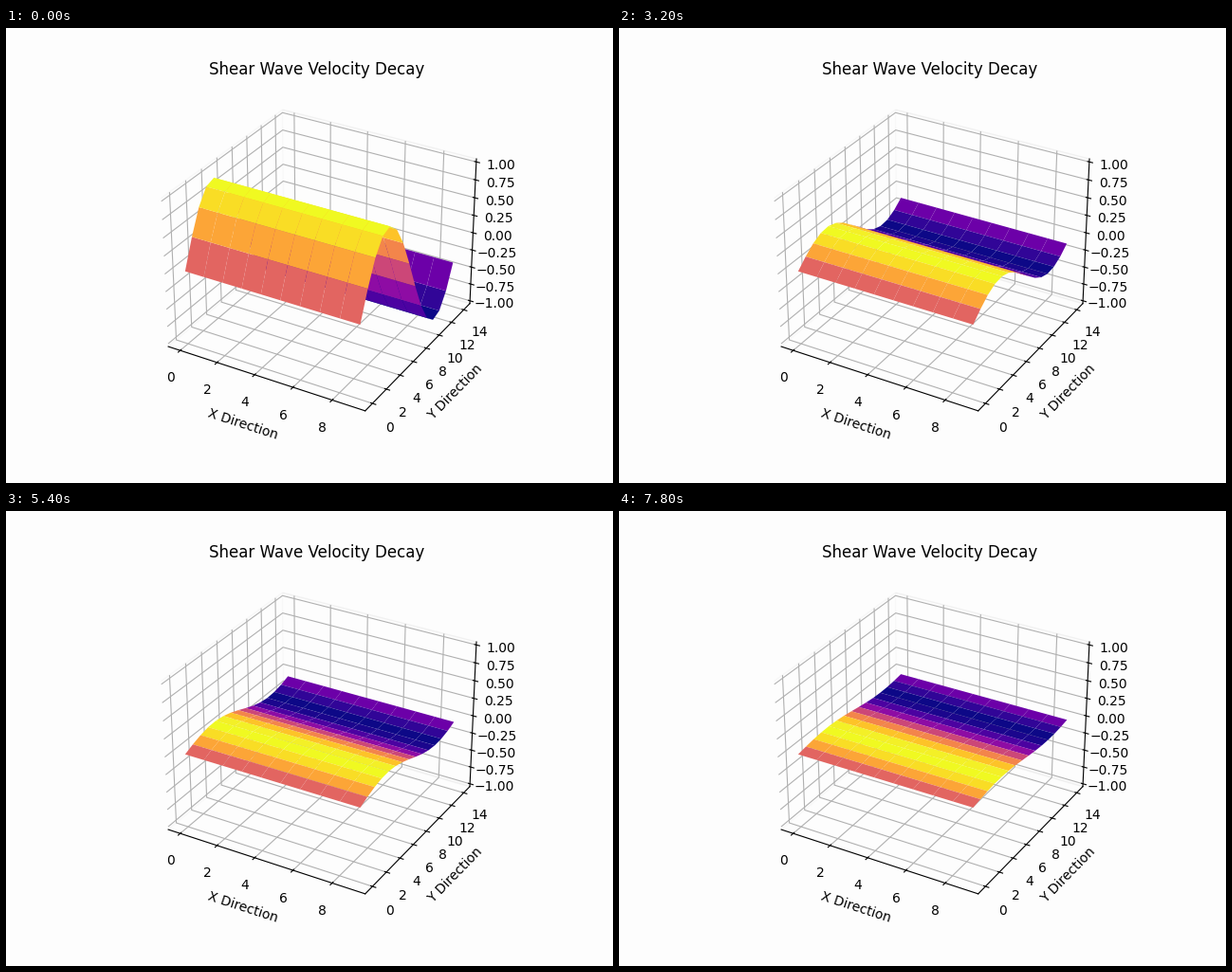
Animation of 640x480 px, one loop 8000 ms. Source, as a matplotlib script:

```python
import numpy as np
import matplotlib.pyplot as plt
from matplotlib.animation import FuncAnimation

NX, NY = 10, 15
FRAMES, INTERVAL = 40, 200
OMEGA = 0.5
PAPER = "#fdfdfd"

X, Y = np.meshgrid(np.arange(NX), np.arange(NY))


def shear_decay(steps):
    """Velocity profiles of a sine shear wave relaxed on a periodic lattice."""
    weights = np.array([1 / 6, 2 / 3, 1 / 6])[:, None]
    u = np.sin(2 * np.pi * np.arange(NY) / NY)
    g = weights * u
    profiles = []
    for _ in range(steps):
        g = g + OMEGA * (weights * u - g)
        g = np.array([np.roll(row, c) for row, c in zip(g, (-1, 0, 1))])
        u = g.sum(axis=0)
        profiles.append(u)
    return profiles


def padded(low, high, margin):
    """Widen a range by its margin, then by 1/48 on each side."""
    pad = (high - low) * margin
    low, high = low - pad, high + pad
    edge = (high - low) / 48
    return low - edge, high + edge


profiles = shear_decay(FRAMES)

fig = plt.figure(figsize=(6.4, 4.8), dpi=100, facecolor=PAPER)
ax = fig.add_subplot(projection="3d", facecolor=PAPER)
ax.set_title("Shear Wave Velocity Decay")
ax.set_xlabel("X Direction")
ax.set_ylabel("Y Direction")
ax.set_xlim(*padded(0, NX - 1, 0.05))
ax.set_ylim(*padded(0, NY - 1, 0.05))
ax.set_zlim(*padded(-1, 1, 0))
for axis in (ax.xaxis, ax.yaxis, ax.zaxis):
    axis.pane.set_facecolor(PAPER)

surface = None


def draw(n):
    global surface
    if surface is not None:
        surface.remove()
    Z = np.repeat(profiles[n][:, None], NX, axis=1)
    surface = ax.plot_surface(X, Y, Z, cmap="plasma")
    return [surface]


anim = FuncAnimation(fig, draw, frames=FRAMES, init_func=lambda: draw(0),
                     interval=INTERVAL, repeat=True, repeat_delay=0)
plt.show()
```
